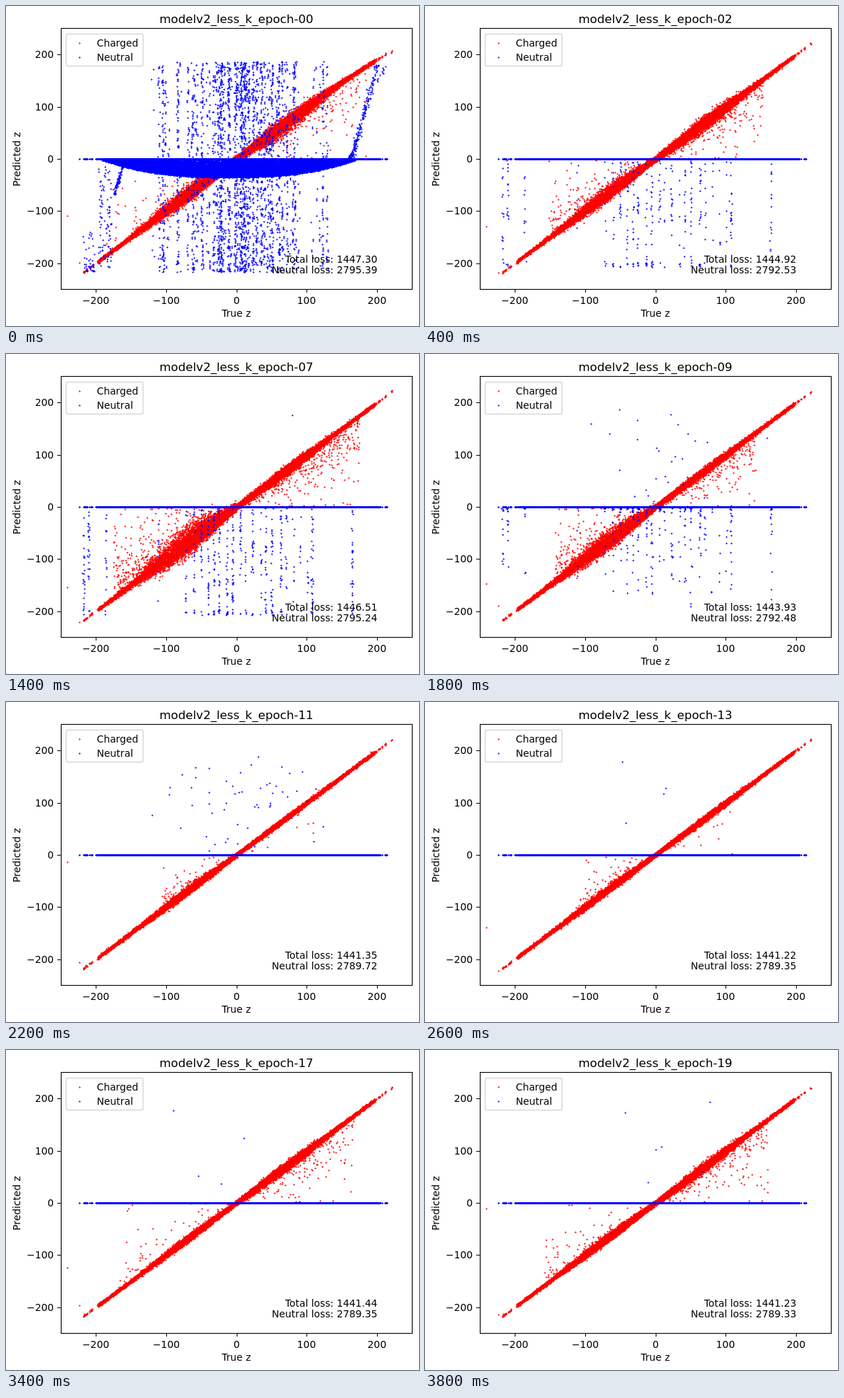
These frames come from a looping animation (580 by 450 pixels, 4000 ms). An HTML page with a canvas:

```html
<!DOCTYPE html>
<html lang="en">
<head>
<meta charset="utf-8">
<title>Predicted z by epoch</title>
<style>
html, body { margin: 0; width: 580px; height: 450px; overflow: hidden; background: #fff; }
canvas { display: block; }
</style>
</head>
<body>
<canvas id="plot" width="580" height="450"></canvas>
<script>
const ctx = document.getElementById('plot').getContext('2d');
const EPOCHS = 20, STEP = 200;
const FONT = '"DejaVu Sans", Verdana, sans-serif';
const TEXT = 13.82, TITLE = 16.58;
const RED = '#f00', BLUE = '#00f', DOT_ALPHA = 0.65;
const ZERO_Y = 215, DEPTH = 150;
const px = v => 323.5 + v * 0.987;
const py = v => ZERO_Y - v * 0.7335;

// Key epochs; the ones between are blended.
// fat: thickness of the diagonal, out: strays up to |z| = reach, down/up: neutral strays
const FIELDS = ['total', 'neutral', 'fatL', 'fatR', 'outL', 'outR', 'reach', 'down', 'up'];
const KEYS = {
  0: [1447.30, 2795.39, 6, 6.5, 110, 200, 185, 18, 0],
  4: [1442.55, 2789.67, 4.5, 4.5, 420, 300, 120, 9, 0],
  7: [1446.51, 2795.24, 12, 3.5, 700, 480, 175, 22, 1],
  11: [1441.35, 2789.72, 2.5, 0.8, 110, 25, 110, 0, 54],
  13: [1441.22, 2789.35, 2.2, 1.5, 100, 35, 110, 0, 4],
  15: [1441.65, 2789.37, 1, 3, 45, 190, 175, 0, 3],
  19: [1441.23, 2789.33, 2.6, 3.2, 120, 230, 160, 0, 6]
};

function rng(seed) {
  return () => {
    seed = (seed + 0x6D2B79F5) | 0;
    let t = Math.imul(seed ^ (seed >>> 15), 1 | seed);
    t = (t + Math.imul(t ^ (t >>> 7), 61 | t)) ^ t;
    return ((t ^ (t >>> 14)) >>> 0) / 4294967296;
  };
}
const gauss = r => Math.sqrt(-2 * Math.log(1 - r())) * Math.cos(2 * Math.PI * r());
const fill = (n, make) => Array.from({ length: n }, (_, i) => make(i));

// True z is the same in every epoch.
const zRand = rng(5);
const trueZ = fill(14000, i => i % 2 ? (zRand() * 2 - 1) * 197 : gauss(zRand) * 72)
  .filter(v => Math.abs(v) < 198);
const edgeZ = [...fill(16, () => -219 + zRand() * 15), ...fill(12, () => 199 + zRand() * 15)];
const columns = [109, 116, 140, 214, 486, ...fill(20, i => 252 + i * 9.3 + zRand() * 4)];

function settings(epoch) {
  const marks = Object.keys(KEYS).map(Number);
  const b = marks.find(k => k >= epoch);
  const a = marks.filter(k => k <= epoch).pop();
  const t = a === b ? 0 : (epoch - a) / (b - a);
  const out = {};
  FIELDS.forEach((name, i) => { out[name] = KEYS[a][i] + (KEYS[b][i] - KEYS[a][i]) * t; });
  return out;
}

function dot(x, y) {
  x = Math.round(x);
  y = Math.round(y);
  ctx.fillRect(x - 1, y, 3, 1);
  ctx.fillRect(x, y - 1, 1, 3);
}

function drawCharged(epoch, s) {
  const r = rng(100 + epoch);
  const sag = epoch === 0 ? 14 : 0;
  const line = v => v > 0 ? v - sag * (v / 220) ** 4 : v;
  const plot = (v, y) => dot(px(v), py(y));
  for (const v of trueZ) {
    const a = Math.abs(v);
    const bump = Math.exp(-(((a - 75) / 55) ** 2));
    const g = gauss(r);
    // wider on the side that faces zero
    const lean = g * v < 0 ? 1.2 : 0.8;
    plot(v, line(v) + g * (1.5 + (v < 0 ? s.fatL : s.fatR) * bump * lean));
  }
  for (const v of [...edgeZ, 220, 221])
    for (let i = 0; i < 2; i++) plot(v, line(v) + gauss(r));
  const strays = (count, sign) => {
    for (let i = 0; i < count; i++) {
      const v = sign * (8 + (s.reach - 8) * r());
      plot(v, line(v) * (1 - Math.min(0.97, -0.25 * Math.log(1 - r()))));
    }
  };
  strays(s.outL, -1);
  strays(s.outR, 1);
  plot(-241, -160 * r());
  plot(-223, -223 + 60 * r() ** 2);
}

function drawZeroLine() {
  const r = rng(9);
  for (let i = 0; i < 4000; i++) dot(126 + r() * 400, ZERO_Y);
  for (const v of [...edgeZ, -223, 212, 213, 214])
    for (let i = 0; i < 3; i++) dot(px(v), ZERO_Y);
}

function drawColumns(epoch, s) {
  const shape = rng(31), r = rng(300 + epoch);
  const power = s.down > 12 ? 1 : 2.5;
  for (const x of columns) {
    const count = s.down * (0.3 + 1.4 * shape() ** 1.5);
    const reach = DEPTH * (0.65 + 0.35 * shape());
    for (let i = 0; i < count; i++) {
      const capped = power === 1 && r() < 0.15;
      const d = capped ? DEPTH - r() * 8 : reach * r() ** power;
      dot(x + gauss(r) * 0.7, ZERO_Y + 2 + d);
    }
  }
}

// First epoch: a solid band, tall columns both ways and two curved tails.
function drawBurst() {
  const r = rng(77);
  for (let i = 0; i < 18000; i++) {
    const x = 135 + r() * 355;
    const depth = 25.5 * (1 - Math.abs((x - 313) / 179) ** 2.6);
    dot(x, ZERO_Y + depth * r() ** 0.8 + 1.5 * r() ** 4);
  }
  for (let i = 0; i < 120; i++) {
    const x = 325 + gauss(r) * 64;
    if (x < 180 || x > 458) continue;
    const count = 2 + 18 * r() ** 1.5;
    for (let j = 0; j < count; j++) {
      const wobble = gauss(r) * 0.8;
      const up = 78 + 134 * r() ** 1.15, down = 374 - 136 * r() ** 1.15;
      dot(x + wobble, up);
      dot(x - wobble, down);
      if (r() < 0.3) dot(x + wobble, up + 2);
      if (r() < 0.3) dot(x - wobble, down - 2);
    }
  }
  for (let i = 0; i < 40; i++) dot(108 + r() * 16, 373 - 60 * r() ** 2);
  for (let i = 0; i < 90; i++) dot(130 + 18 * r(), 220 + 148 * r());
  for (let i = 0; i < 80; i++) {
    const t = r();
    dot(152 + t * 12 + gauss(r), 265 - t * 42);
  }
  for (let i = 0; i < 200; i++) {
    const t = r() ** 1.3;
    dot(484 + t * 37 + gauss(r) * 1.8, 213 - 133 * t ** 1.15);
  }
  for (let i = 0; i < 14; i++) dot(519 + r() * 15, 79 + r() * 28);
}

function drawNeutral(epoch, s) {
  drawZeroLine();
  if (epoch === 0) drawBurst();
  else if (s.down > 0) drawColumns(epoch, s);
  const r = rng(500 + epoch);
  for (let i = 0; i < Math.round(s.up); i++)
    dot(Math.min(480, Math.max(205, 335 + gauss(r) * 60)), 72 + r() * 138);
}

function label(text, x, y, align = 'center', size = TEXT) {
  ctx.font = size + 'px ' + FONT;
  ctx.textAlign = align;
  ctx.fillText(text, x, y);
}

function drawAxes() {
  ctx.fillStyle = ctx.strokeStyle = '#000';
  ctx.lineWidth = 1.1;
  ctx.strokeRect(77.5, 31.5, 493, 367);
  for (let v = -200; v <= 200; v += 100) {
    const text = String(v).replace('-', '\u2212');
    const x = Math.round(px(v)), y = Math.round(py(v));
    ctx.fillRect(x, 398, 1, 5);
    ctx.fillRect(72, y, 5, 1);
    label(text, x, 419);
    label(text, 67, y + 5, 'right');
  }
  label('True z', 323.5, 437);
  ctx.save();
  ctx.translate(20, 215.5);
  ctx.rotate(-Math.PI / 2);
  label('Predicted z', 0, 0);
  ctx.restore();
}

function drawLegend() {
  ctx.fillStyle = 'rgba(255,255,255,0.8)';
  ctx.strokeStyle = 'rgba(204,204,204,0.8)';
  ctx.lineWidth = 1.38;
  ctx.beginPath();
  ctx.roundRect(84.5, 39.5, 108, 45, 2.8);
  ctx.fill();
  ctx.stroke();
  [['Charged', RED, 52], ['Neutral', BLUE, 72]].forEach(([name, color, y]) => {
    ctx.globalAlpha = DOT_ALPHA;
    ctx.fillStyle = color;
    dot(103, y);
    ctx.globalAlpha = 1;
    ctx.fillStyle = '#000';
    label(name, 127.5, y + 4.5, 'left');
  });
}

function draw(epoch) {
  const s = settings(epoch);
  ctx.fillStyle = '#fff';
  ctx.fillRect(0, 0, 580, 450);
  ctx.globalAlpha = DOT_ALPHA;
  ctx.fillStyle = RED;
  drawCharged(epoch, s);
  ctx.fillStyle = BLUE;
  drawNeutral(epoch, s);
  ctx.globalAlpha = 1;
  drawAxes();
  label('modelv2_less_k_epoch-' + String(epoch).padStart(2, '0'), 323.5, 24, 'center', TITLE);
  label('Total loss: ' + s.total.toFixed(2), 521.5, 361, 'right');
  label('Neutral loss: ' + s.neutral.toFixed(2), 521.5, 376, 'right');
  drawLegend();
}

let shown = -1;
const start = performance.now();
function tick() {
  const epoch = Math.floor((performance.now() - start) / STEP) % EPOCHS;
  if (epoch !== shown) draw(shown = epoch);
  requestAnimationFrame(tick);
}
tick();
</script>
</body>
</html>
```
